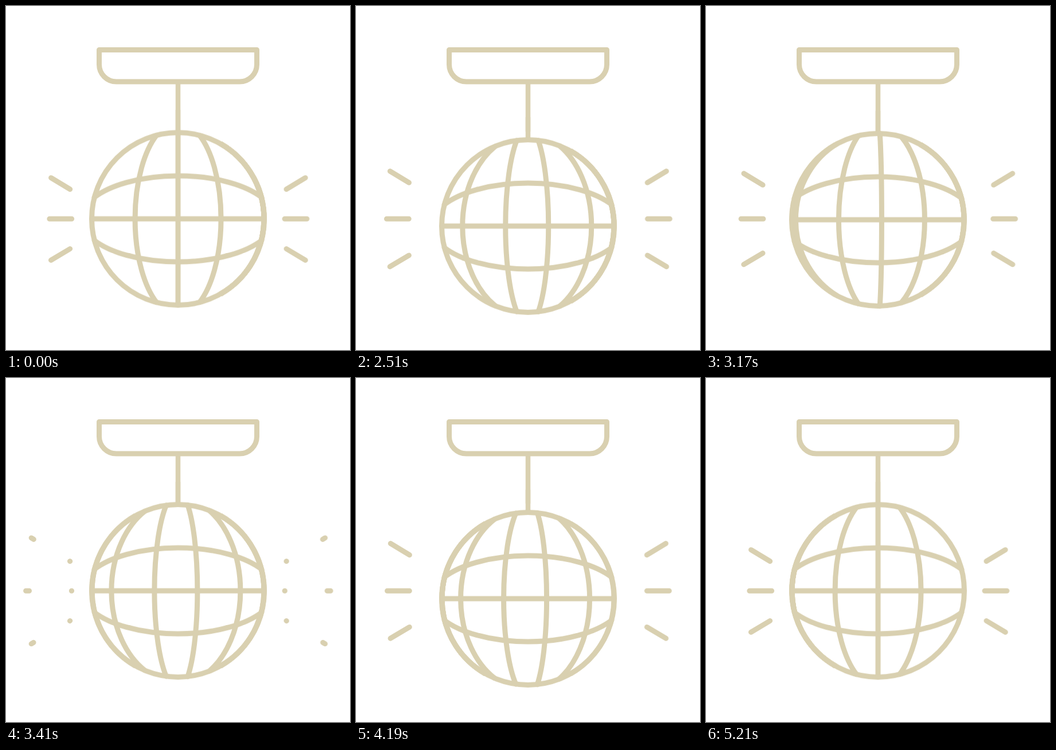
These frames come from a looping animation (600 by 600 pixels, 5240 ms). An HTML page without scripts:

```html
<!DOCTYPE html>
<html lang="en">
<head>
<meta charset="utf-8">
<title>Disco ball</title>
<style>
  @property --turn {
    syntax: "<number>";
    inherits: true;
    initial-value: 0;
  }

  html, body {
    margin: 0;
    width: 100%;
    height: 100%;
    overflow: hidden;
    background: #fff;
  }

  svg {
    display: block;
    width: 100%;
    height: 100%;
    fill: none;
    stroke: #d9d0b0;
    stroke-width: 9;
    stroke-linecap: round;
    stroke-linejoin: round;
  }

  .cord { stroke-width: 8.5; stroke-linecap: butt; }

  .ball { animation: bob 5.24s infinite; }

  .grid { animation: turn 5.24s infinite; }

  /* Each meridian is an arc of the unit circle, squeezed by its place on the equator.
     Past the rim it is clamped and lies under the outline. */
  .grid path {
    --x: clamp(-150, 75 * var(--i) - 74.95 - var(--turn), 150);
    transform: scale(var(--x), calc(174 - var(--x) * var(--x) / 970));
    vector-effect: non-scaling-stroke;
  }

  .rays {
    stroke-dasharray: 38.7 73.8;
    animation: shine 5.24s infinite;
  }

  @keyframes bob {
    0%, 38.17% { transform: translateY(0); animation-timing-function: cubic-bezier(.37, 0, .63, 1); }
    51.15% { transform: translateY(14.7px); animation-timing-function: cubic-bezier(.37, 0, .63, 1); }
    63.55% { transform: translateY(-.5px); animation-timing-function: cubic-bezier(.37, 0, .63, 1); }
    77.1% { transform: translateY(14.7px); animation-timing-function: cubic-bezier(.37, 0, .63, 1); }
    93.51%, 100% { transform: translateY(0); }
  }

  @keyframes turn {
    0%, 38.17% { --turn: 0; animation-timing-function: cubic-bezier(.333, .04, .667, .515); }
    55.92% { --turn: 101; animation-timing-function: cubic-bezier(.333, .281, .667, .644); }
    65.08% { --turn: 191; animation-timing-function: cubic-bezier(.333, .319, .667, .697); }
    73.66% { --turn: 285; animation-timing-function: cubic-bezier(.333, .41, .667, .745); }
    87.4% { --turn: 396; animation-timing-function: cubic-bezier(.333, .459, .667, 1); }
    99.43%, 100% { --turn: 450; }
  }

  @keyframes shine {
    0%, 38.17% { stroke-dashoffset: 0; animation-timing-function: cubic-bezier(.333, .03, .667, .3); }
    55.92% { stroke-dashoffset: -75.3; animation-timing-function: cubic-bezier(.333, .245, .667, .663); }
    65.08% { stroke-dashoffset: -186.4; animation-timing-function: cubic-bezier(.333, .347, .667, .671); }
    73.66% { stroke-dashoffset: -287.5; animation-timing-function: cubic-bezier(.333, .4, .667, .811); }
    87.4% { stroke-dashoffset: -420.6; animation-timing-function: cubic-bezier(.333, .75, .667, 1); }
    99.43%, 100% { stroke-dashoffset: -450; }
  }
</style>
</head>
<body>
<svg viewBox="0 0 600 600">
  <path d="M162.5 76.5H437.5V102A30 30 0 0 1 407.5 132H192.5A30 30 0 0 1 162.5 102Z"/>
  <path class="cord" d="M300 132V219"/>

  <g transform="translate(300 371.2)">
    <g class="ball">
      <path class="cord" d="M0 -190V-150"/>
      <circle r="150.5"/>
      <path d="M-150 0H150M-146 -37.5A168.6 75 0 0 1 146 -37.5M-146 37.5A168.6 75 0 0 0 146 37.5"/>
      <g class="grid">
        <path style="--i:0" d="M.5 -.866A1 1 0 0 1 .5 .866"/>
        <path style="--i:1" d="M.5 -.866A1 1 0 0 1 .5 .866"/>
        <path style="--i:2" d="M.5 -.866A1 1 0 0 1 .5 .866"/>
        <path style="--i:3" d="M.5 -.866A1 1 0 0 1 .5 .866"/>
        <path style="--i:4" d="M.5 -.866A1 1 0 0 1 .5 .866"/>
        <path style="--i:5" d="M.5 -.866A1 1 0 0 1 .5 .866"/>
        <path style="--i:6" d="M.5 -.866A1 1 0 0 1 .5 .866"/>
        <path style="--i:7" d="M.5 -.866A1 1 0 0 1 .5 .866"/>
        <path style="--i:8" d="M.5 -.866A1 1 0 0 1 .5 .866"/>
      </g>
    </g>
  </g>

  <g class="rays">
    <g id="side">
      <path d="M111.7 319.7L44.2 278.9"/>
      <path d="M114.6 371.2H34.6"/>
      <path d="M111.7 423.5L44.2 463.6"/>
    </g>
    <use href="#side" transform="translate(600.7) scale(-1 1)"/>
  </g>
</svg>
</body>
</html>
```
